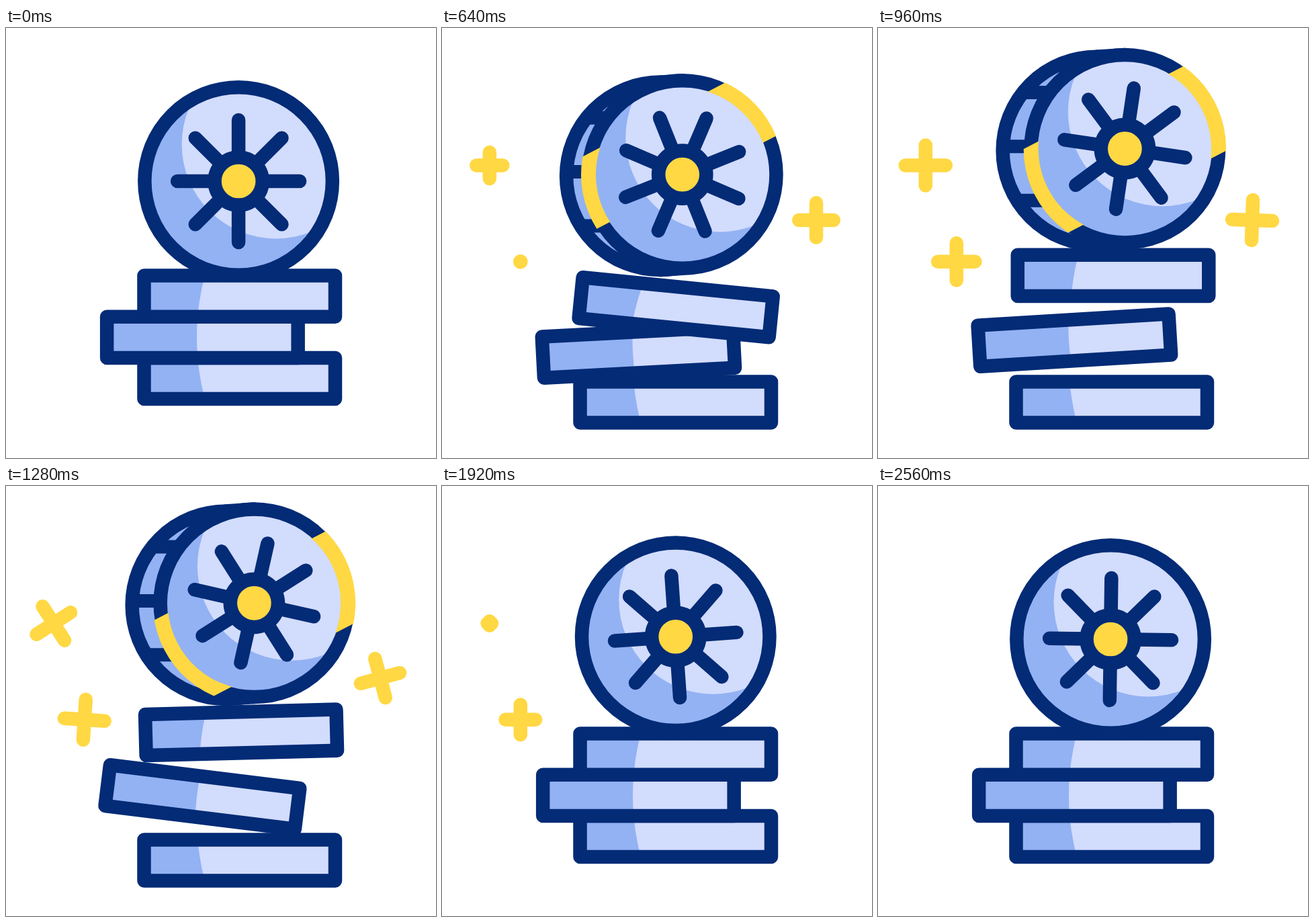
An HTML page with a canvas that plays this animation: 640x640 px, repeating every 2600 ms.

```html
<!DOCTYPE html>
<html lang="en">
<head>
<meta charset="utf-8">
<title>Balancing coins</title>
<style>
  html, body { margin: 0; width: 100%; height: 100%; overflow: hidden; background: #fff; }
  canvas { display: block; }
</style>
</head>
<body>
<canvas id="stage" width="640" height="640"></canvas>
<script>
const ctx = document.getElementById('stage').getContext('2d');
const NAVY = '#032b76', LIGHT = '#d2dcfd', SHADE = '#93b2f3', YELLOW = '#ffd843';
const LOOP = 2600, STEP = 40, LINE = 20.5, RADIUS = 139.75;

const stars = [
  { x: 557, y: 286, grow: 312, turn: 917, shrink: 1525, fade: 390 },
  { x: 70.8, y: 204.5, grow: 382, turn: 990, shrink: 1560, fade: 450 },
  { x: 116.8, y: 347.8, grow: 605, turn: 1220, shrink: 1777, fade: 430 }
];

// Smooth step from 0 to 1.
function ease(t, start, duration) {
  const u = Math.min(1, Math.max(0, (t - start) / duration));
  return u * u * (3 - 2 * u);
}

// Rises to 1, holds, and falls back to 0.
function pulse(t, rise, riseTime, fall, fallTime) {
  return ease(t, rise, riseTime) - ease(t, fall, fallTime);
}

function stackPose(t) {
  const low = 35.5 * pulse(t, 120, 440, 1460, 420);
  const mid = low - 32.8 * pulse(t, 319, 741, 1290, 435);
  const lift = pulse(t, 540, 390, 1290, 445);
  return {
    low, mid,
    high: mid - 35 * lift,
    shift: 2.3 * lift,
    midTilt: 7 * pulse(t, 960, 320, 1280, 430) - 3.45 * pulse(t, 200, 570, 960, 320),
    topTilt: 5.7 * pulse(t, 200, 440, 640, 300) - 1.5 * pulse(t, 960, 320, 1280, 330)
  };
}

function coinPose(t) {
  const glintTop = 0.072 * (t - 640) - 92 - 200 * (1 - ease(t, 200, 440)) + 230 * ease(t, 1280, 475);
  return {
    x: 346.1 + 23.3 * pulse(t, 140, 1000, 1350, 680),
    y: 228 - 53.7 * pulse(t, 474, 604, 1350, 680),
    depth: 42 * pulse(t, 150, 700, 1350, 470),
    spin: 12.7 * pulse(t, 640, 410, 1280, 540) - 21.8 * pulse(t, 120, 520, 640, 410)
      - 4 * ease(t, 1500, 420) + 4.8 * ease(t, 1920, 640),
    glintTop,
    glintWidth: 141 * ease(t, 300, 507)
  };
}

function at(x, y, degrees, draw) {
  ctx.save();
  ctx.translate(x, y);
  ctx.rotate(degrees * Math.PI / 180);
  draw();
  ctx.restore();
}

function circle(x, y, r) {
  ctx.beginPath();
  ctx.arc(x, y, r, 0, Math.PI * 2);
}

function fill(color) {
  ctx.fillStyle = color;
  ctx.fill();
}

function stroke(color, width = LINE) {
  ctx.strokeStyle = color;
  ctx.lineWidth = width;
  ctx.stroke();
}

function line(x0, y0, x1, y1, color, width) {
  ctx.beginPath();
  ctx.moveTo(x0, y0);
  ctx.lineTo(x1, y1);
  stroke(color, width);
}

// Outlined shape in shade, with a large light circle clipped inside it.
function shaded(shape, lightX, lightY, lightRadius) {
  ctx.save();
  shape();
  fill(SHADE);
  ctx.clip();
  circle(lightX, lightY, lightRadius);
  fill(LIGHT);
  ctx.restore();
  shape();
  stroke(NAVY);
}

function drawBar(cx, cy, dx, dy, tilt) {
  const shape = () => {
    ctx.beginPath();
    ctx.rect(-142.25, -30.6, 284.5, 61.2);
  };
  at(cx + dx, cy + dy, tilt, () => shaded(shape, 643 - cx, 460.3 - cy, 359));
}

function drawBack(depth, rise) {
  circle(0, 0, RADIUS);
  fill(SHADE);
  ctx.save();
  ctx.clip();
  for (let i = -1; i <= 1; i++) line(-150, 80.4 * i - 6.3, 0, 80.4 * i - 6.3, NAVY, 20);
  ctx.restore();
  circle(0, 0, RADIUS);
  stroke(NAVY);
  for (const y of [-RADIUS, RADIUS]) line(0, y, depth, y + rise, NAVY);
}

function drawGlint(top, width) {
  ctx.beginPath();
  ctx.rect(-200, top, 400, width);
  ctx.clip();
  circle(0, 0, RADIUS);
  stroke(YELLOW, 22);
}

function drawFace({ spin, glintTop, glintWidth }) {
  shaded(() => circle(0, 0, RADIUS), 56, -55, 140.5);
  at(0, 0, -27.4, () => drawGlint(glintTop, glintWidth));
  for (let i = 0; i < 8; i++) {
    at(0, 0, spin + i * 45, () => line(0, -36, 0, -91, NAVY));
  }
  circle(0, 0, 35.6);
  fill(YELLOW);
  stroke(NAVY);
}

function drawCoin(pose) {
  const { x, y, depth } = pose, rise = -depth * 0.07;
  if (depth > 0) at(x - depth, y - rise, 0, () => drawBack(depth, rise));
  at(x, y, 0, () => drawFace(pose));
}

function drawStar({ x, y, grow, turn, shrink, fade }, t) {
  if (t <= grow || t >= shrink + fade) return;
  const arm = 30 * pulse(t, grow, 430, shrink, fade) + 0.05;
  at(x, y, 90 * ease(t, turn, 490), () => {
    line(-arm, 0, arm, 0, YELLOW);
    line(0, -arm, 0, arm, YELLOW);
  });
}

function render(t) {
  ctx.fillStyle = '#fff';
  ctx.fillRect(0, 0, 640, 640);
  ctx.lineCap = ctx.lineJoin = 'round';

  const { low, mid, high, shift, midTilt, topTilt } = stackPose(t);
  drawBar(347.75, 521.5, 0, low, 0);
  drawBar(292.4, 460.3, 0, mid, midTilt);
  drawBar(347.75, 399.1, shift, high, topTilt);
  drawCoin(coinPose(t));
  for (const star of stars) drawStar(star, t);
}

const begin = performance.now();
function tick() {
  const t = (performance.now() - begin) % LOOP;
  render(Math.floor(t / STEP) * STEP);
  requestAnimationFrame(tick);
}
tick();
</script>
</body>
</html>
```
